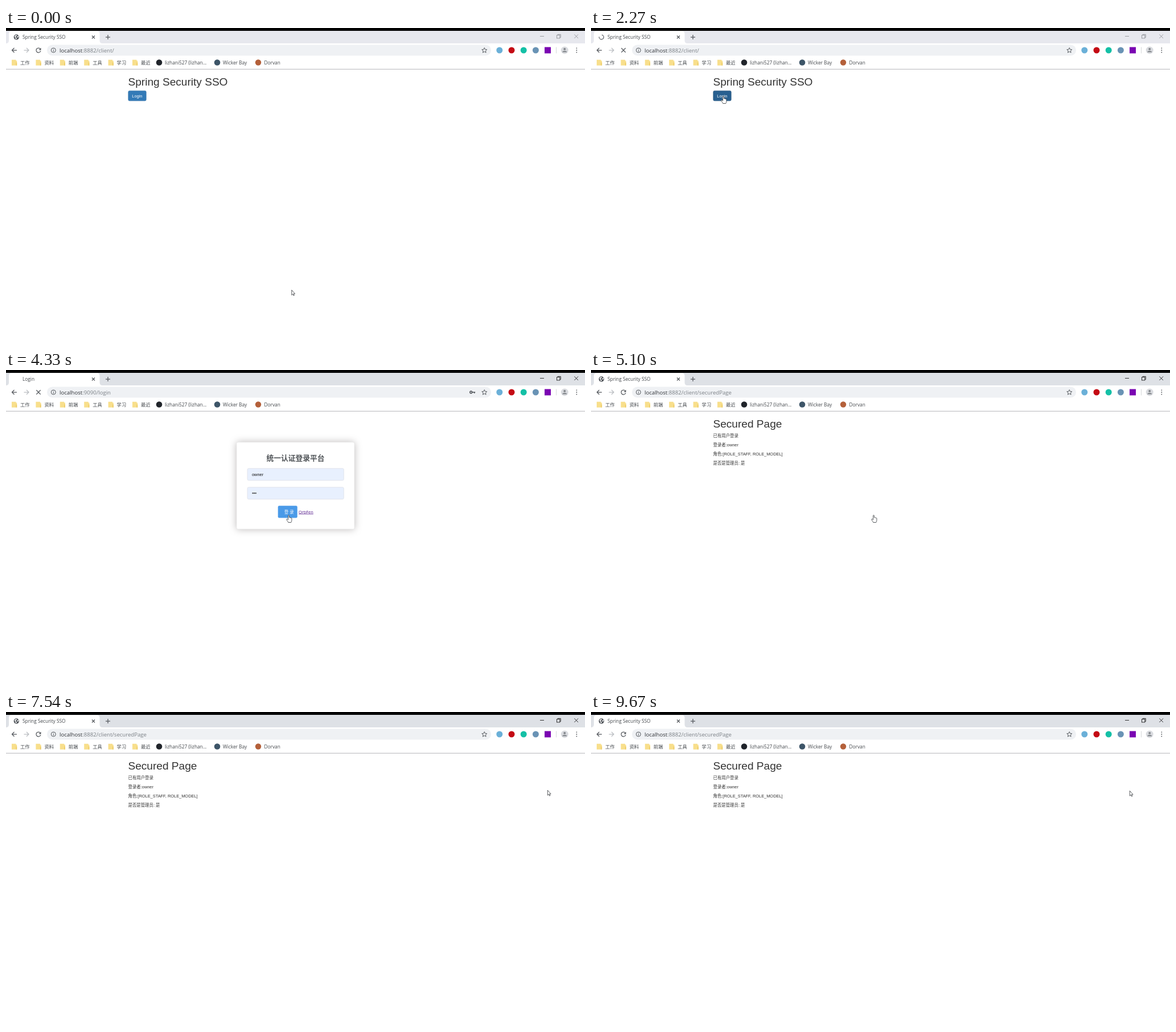
An HTML page for the animation above (9700 ms loop, 1017 by 551 pixels).

```html
<!DOCTYPE html>
<html lang="zh">
<head>
<meta charset="utf-8">
<title>Single sign-on demo</title>
<style>
html, body { margin: 0; width: 100%; height: 100%; overflow: hidden; background: #fff; }
svg { display: block; width: 1017px; height: 551px; }
.ui { font: 8.3px "Open Sans", "Noto Sans CJK SC", "Noto Sans CJK", sans-serif; fill: #45494d; }
.url { font-size: 9.6px; fill: #303338; }
.url .path { fill: #7b8086; }
.page { font: 7.42px "Liberation Sans", "Noto Sans CJK SC", "Noto Sans CJK", sans-serif; fill: #333; }
.page .h1 { font-size: 19.08px; }
.page .title { font-size: 12.75px; font-weight: bold; fill: #505458; }
.page .light { fill: #fff; }
.page .link { font-size: 7.4px; fill: #551a8b; text-decoration: underline; }
.icon { fill: none; stroke: #55595e; stroke-width: 1.25; }
.thin { stroke-width: 1; }
.bold { stroke-width: 1.6; }
.dim { stroke: #babdc1; }
.card { fill: #fff; stroke: #e6e6e6; stroke-width: .6; filter: drop-shadow(0 0 6.6px #bdbaba); }
.field { stroke: #dcdfe6; stroke-width: .7; }
</style>
</head>
<body>
<svg viewBox="0 0 1017 551">
  <rect width="1017" height="551" fill="#fff"/>
  <rect id="bar" y="4" width="1017" height="23"/>
  <rect width="1017" height="5"/>
  <path d="M0 27Q5 27 5 22V10Q5 5.5 9.5 5.5H160Q164.5 5.5 164.5 10V22Q164.5 27 169.5 27Z" fill="#fff"/>

  <g class="ui">
    <g id="globe">
      <circle cx="18.3" cy="16" r="4.7" fill="#55595e"/>
      <path d="M15 14.5l2.5-2.3 1.5.6-.6 1.7-1.7.5.2 1.5 2 .6-.5 2-1.2 1-.4-2.1zM20.5 14.2l1.3-.7.4 2.3-1.5 1.3-1-1z" fill="#fff"/>
    </g>
    <path id="spinner" class="icon" d="M18.3 12a4 4 0 1 1-4 4"/>
    <text id="tabTitle" x="29" y="19"/>
    <path class="icon" d="M151 13.5l5 5m0-5l-5 5M175 16h8m-4-4v8"/>
    <g id="controls" fill="none" stroke-width=".9">
      <path d="M938 14.5h7M998.3 11.3l6.7 6.7m0-6.7l-6.7 6.7M969 12.5v-1.2h5.3v5.3h-1.3"/>
      <rect x="967.5" y="12.7" width="5.3" height="5.3"/>
    </g>

    <path class="icon" d="M19 39h-8.5m4-4l-4 4 4 4"/>
    <path class="icon dim" d="M31.5 39h8.5m-4-4l4 4-4 4"/>
    <g id="reload">
      <path class="icon" d="M60.2 36.6a4 4 0 1 0 .7 3.5"/>
      <path d="M61.5 34.7v4h-4z" fill="#55595e"/>
    </g>
    <path id="stop" class="icon" d="M53.3 35.3l7.4 7.4m0-7.4l-7.4 7.4"/>
    <rect x="72" y="29.5" width="780" height="19" rx="9.5" fill="#eff1f4"/>
    <circle class="icon thin" cx="83.3" cy="39" r="4"/>
    <path class="icon thin" d="M83.3 36.5v1.1m0 .9v3"/>
    <text class="url" x="94" y="42.5">localhost<tspan id="path" class="path"/></text>
    <g id="key">
      <circle class="icon bold" cx="816.8" cy="39" r="1.9"/>
      <path class="icon bold" d="M819 39h5.2m-1.5 0v2"/>
    </g>
    <path class="icon thin" d="M840.3 34.6l1.3 3 3.2.3-2.4 2.1.7 3.2-2.8-1.7-2.8 1.7.7-3.2-2.4-2.1 3.2-.3z"/>
    <g id="extensions"></g>
    <rect x="946" y="33.5" width="11" height="11" fill="#7a05b2"/>
    <path d="M966.5 33.5v11" stroke="#d5d7da"/>
    <circle cx="981.2" cy="39" r="6.5" fill="#d9dbdf"/>
    <circle cx="981.2" cy="37" r="2" fill="#83878c"/>
    <path d="M977.2 42.5q0-2.5 4-2.5t4 2.5z" fill="#83878c"/>
    <path d="M1002.3 35.3v8" stroke="#55595e" stroke-width="1.8" stroke-linecap="round" stroke-dasharray="0 3.7"/>

    <g id="folders"></g>
    <circle cx="269" cy="60.5" r="5.3" fill="#20242a"/>
    <text x="279" y="64">lizhani527 (lizhan...</text>
    <circle cx="371" cy="60.5" r="5.3" fill="#3d5568"/>
    <text x="381" y="64">Wicker Bay</text>
    <circle cx="443" cy="60.5" r="5.2" fill="#b4603a"/>
    <text x="453.5" y="64">Dorvan</text>
  </g>
  <path d="M0 72.3h1017" stroke="#b4b6b9"/>

  <g id="home" class="page">
    <text class="h1" x="214.5" y="101">Spring Security SSO</text>
    <rect id="loginButton" x="214.8" y="110.2" width="31.4" height="17.6" rx="2.2" stroke-width=".6"/>
    <text class="light" x="221.3" y="121.7">Login</text>
  </g>

  <g id="form" class="page">
    <rect class="card" x="405" y="126.8" width="207" height="152.4" rx="2.5"/>
    <text class="title" x="508.5" y="159" text-anchor="middle">统一认证登录平台</text>
    <g id="fields">
      <rect class="field" x="424" y="172.7" width="169.3" height="21" rx="2.2"/>
      <rect class="field" x="424" y="205.7" width="169.3" height="21" rx="2.2"/>
    </g>
    <g id="values">
      <text x="432" y="185.8">owner</text>
      <path d="M433.5 216.2h6" stroke="#444" stroke-width="2.3" stroke-linecap="round" stroke-dasharray="0 2.6"/>
    </g>
    <rect id="submit" x="477.7" y="238.3" width="34" height="21.2" rx="2.2"/>
    <text class="light" x="488.8" y="251.8">登 录</text>
    <text class="ui link" x="514" y="251.5">OrbFen</text>
  </g>

  <g id="secured" class="page">
    <text class="h1" x="214.5" y="101">Secured Page</text>
    <text x="214.5" y="118">已有用户登录</text>
    <text x="214.5" y="134">登录者:owner</text>
    <text x="214.5" y="149.8">角色:[ROLE_STAFF, ROLE_MODEL]</text>
    <text x="214.5" y="165.7">是否是管理员: 是</text>
  </g>

  <g id="cursor" stroke="#33363a" stroke-width=".8" stroke-linejoin="round" fill="#fff">
    <path id="arrow" d="M.3 .3V9.2L2.3 7.3 3.6 10.2 4.9 9.6 3.6 6.8H6.1Z"/>
    <path id="hand" d="M-.9 7.8V1Q-.9 .2 0 .2T.9 1V4.3Q2.3 3.7 2.5 4.7 3.9 4.2 4.1 5.2 5.4 4.9 5.4 6V9Q5.4 11.2 4.2 13H-.7Q-1.5 11-3.5 8.6-4.1 7.3-3.1 6.8-2.1 6.7-.9 8.3Z"/>
  </g>
</svg>
<script>
const LOOP = 9700;
const T = { hover: 850, click: 1300, blur: 1650, form: 3320, autofill: 3480, submitHover: 4020, submit: 4220, secured: 4760, leave: 5440 };

// time, x and y of the pointer tip; "smooth" eases into the key
const pointer = [
  [0, 501.5, 459.5],
  [250, 501.5, 459.5],
  [950, 232.5, 119.5, "smooth"],
  [3550, 232.5, 119.5],
  [4150, 496.5, 254.5, "smooth"],
  [5420, 496.5, 254.5],
  [6000, 840, 177, "smooth"],
  [6100, 878, 160],
  [6650, 951, 137, "smooth"],
  [8300, 951, 137],
  [8900, 946, 138, "smooth"],
  [LOOP, 946, 138]
];

const $ = id => document.getElementById(id);
const show = (id, on) => $(id).setAttribute("display", on ? "inline" : "none");
const set = (id, attrs) => { for (const k in attrs) $(id).setAttribute(k, attrs[k]); };
const text = (id, value) => { if ($(id).textContent !== value) $(id).textContent = value; };
const within = (t, a, b) => t >= a && t < b;

$("extensions").innerHTML = ["#6bb0d8", "#c40a14", "#14c0a6", "#6993b5"]
  .map((color, i) => `<circle cx="${866.8 + i * 21.2}" cy="39" r="5.5" fill="${color}"/>`).join("");

$("folders").innerHTML = ["工作", "资料", "前端", "工具", "学习", "最近"].map((name, i) => {
  const x = 10 + i * 42.4;
  return `<path d="M${x} 55.8h7.5v1.7h1.7v8.2h-9.2z" fill="#f8df8c"/>
    <path d="M${x + 7.5} 60.5h1.7v5.2h-1.7z" fill="#edcc68"/>
    <text x="${x + 15}" y="64">${name}</text>`;
}).join("");

function pointerAt(t) {
  const i = Math.max(1, pointer.findIndex(k => k[0] > t));
  const [t0, x0, y0] = pointer[i - 1];
  const [t1, x1, y1, ease] = pointer[i];
  let p = (t - t0) / (t1 - t0);
  if (ease) p = p * p * (3 - 2 * p);
  return [x0 + (x1 - x0) * p, y0 + (y1 - y0) * p];
}

function render(t) {
  const onHome = t < T.form;
  const onForm = within(t, T.form, T.secured);
  const loading = within(t, T.click, T.form) || within(t, T.submit, T.secured);
  const active = within(t, T.click, T.blur) || t >= T.submit;
  const filled = t >= T.autofill;

  show("home", onHome);
  show("form", onForm);
  show("secured", t >= T.secured);
  text("tabTitle", onForm ? "Login" : "Spring Security SSO");
  text("path", onHome ? ":8882/client/" : onForm ? ":9090/login" : ":8882/client/securedPage");

  set("bar", { fill: active ? "#dee1e6" : "#e7e8ee" });
  set("controls", { stroke: active ? "#222" : "#93959a" });
  show("globe", !loading);
  show("reload", !loading);
  show("stop", loading);
  const wait = t - (onHome ? T.click : T.submit);
  show("spinner", loading && wait > 130);
  set("spinner", { transform: `rotate(${-wait * 0.36} 18.3 16)` });

  const hovered = t >= T.hover;
  set("loginButton", { fill: hovered ? "#286090" : "#337ab7", stroke: hovered ? "#204d74" : "#2e6da4" });
  show("key", onForm && filled);
  set("fields", { fill: filled ? "#e8f0fe" : "#fff" });
  set("values", { fill: filled ? "#111" : "#606266" });
  set("submit", { fill: t >= T.submitHover ? "#4a9ae8" : "#459ffc" });

  const [x, y] = pointerAt(t);
  const hand = within(t, T.hover, 3600) || within(t, T.submitHover, T.leave);
  set("cursor", { transform: `translate(${x} ${y})` });
  show("hand", hand);
  show("arrow", !hand);
}

const start = performance.now();
function tick() {
  render((performance.now() - start) % LOOP);
  requestAnimationFrame(tick);
}
tick();
</script>
</body>
</html>
```
